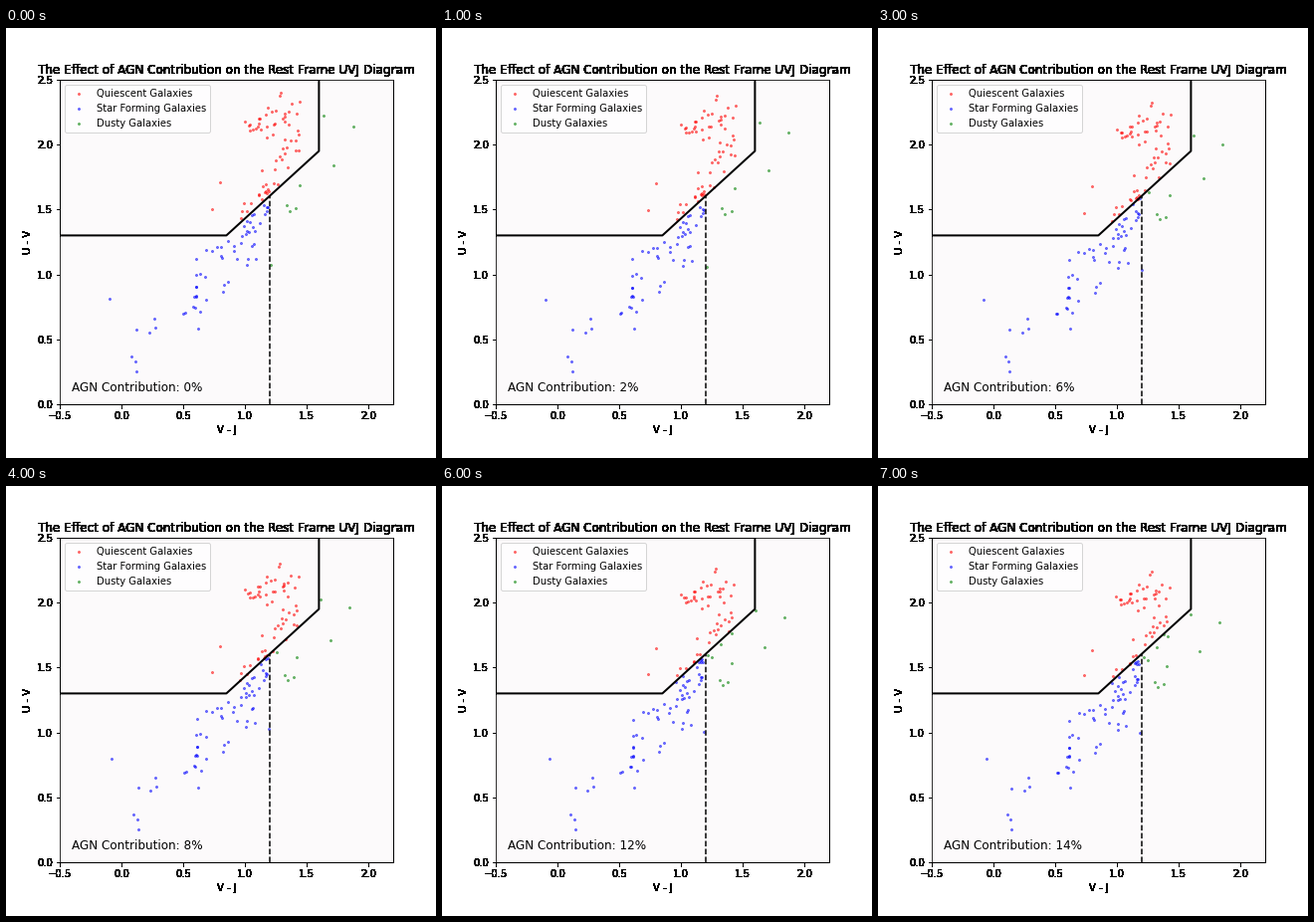
A matplotlib script that plays this animation: 432 by 432 pixels, repeating every 8 s.

```python
import numpy as np
import matplotlib.pyplot as plt
from matplotlib.animation import FuncAnimation

SIZE, DPI = 432, 72
FRAMES, INTERVAL, STEP = 8, 1000, 2  # STEP: percent added per frame
RECT = [0.125, 0.125, 0.775, 0.755]
XLIM, YLIM = (-0.5, 2.2), (0, 2.5)
KNEE, TOP_VJ, MIN_UV, TOP_UV = 0.85, 1.6, 1.3, 1.95
DUSTY_VJ = 1.2
AGN_VJ, AGN_UV = 0.8, 0.36
LAYERS = 40  # stacked axes give the heavy outer labels

rng = np.random.default_rng(7)


def boundary(vj):
    slope = (TOP_UV - MIN_UV) / (TOP_VJ - KNEE)
    return MIN_UV + slope * np.maximum(vj - KNEE, 0)


def box(n, vj, uv):
    """Galaxies spread evenly over a box."""
    return np.column_stack([rng.uniform(*vj, n), rng.uniform(*uv, n)])


def band(n, vj, offset):
    """Galaxies spread along the boundary, offset from it in U - V."""
    pts = box(n, vj, offset)
    pts[:, 1] += boundary(pts[:, 0])
    return pts


OUTLIERS = [(1.88, 2.14), (1.64, 2.22), (1.72, 1.84), (1.44, 1.69),
            (1.21, 1.07), (0.80, 1.71), (0.73, 1.50), (1.29, 2.40),
            (-0.10, 0.81), (0.08, 0.37), (0.11, 0.33), (0.12, 0.25)]

VJ, UV = np.vstack([
    OUTLIERS,
    box(11, (1.00, 1.14), (2.09, 2.20)),    # quiescent
    box(22, (1.17, 1.47), (2.02, 2.38)),
    band(12, (0.94, 1.20), (0.02, 0.13)),
    band(18, (1.13, 1.45), (0.03, 0.30)),
    band(18, (0.92, 1.19), (-0.17, -0.02)),  # star forming
    box(7, (0.66, 0.90), (1.12, 1.26)),
    box(7, (0.59, 0.61), (0.82, 1.15)),
    box(6, (0.62, 0.98), (0.80, 1.02)),
    box(8, (0.90, 1.10), (1.05, 1.26)),
    box(6, (0.48, 0.66), (0.56, 0.79)),
    box(4, (0.03, 0.30), (0.55, 0.72)),
    box(3, (1.29, 1.42), (1.46, 1.57)),      # dusty
]).T

# AGN / galaxy flux ratio in V at 14 %, larger for dust-reddened galaxies
RATIO = 0.03 + 0.05 * np.clip((VJ - 0.4 * UV - 0.42) / 0.3, 0, 1)


def mag(flux_ratio):
    return 2.5 * np.log10(flux_ratio)


def mix(percent):
    """Colours of each galaxy with the AGN light added."""
    v = RATIO * percent / 14
    u = v * 10 ** (0.4 * (UV - AGN_UV))
    j = v * 10 ** (0.4 * (AGN_VJ - VJ))
    return VJ + mag((1 + j) / (1 + v)), UV - mag((1 + u) / (1 + v))


def classify(vj, uv):
    quiescent = (vj < TOP_VJ) & (uv > boundary(vj))
    dusty = ~quiescent & (vj >= DUSTY_VJ)
    return quiescent, ~quiescent & ~dusty, dusty


def add_layer(fig):
    ax = fig.add_axes(RECT, facecolor="#fcfafb")
    ax.set(xlim=XLIM, ylim=YLIM, xlabel="V - J", ylabel="U - V",
           title="The Effect of AGN Contribution on the Rest Frame UVJ Diagram")
    return ax


plt.rcParams["font.family"] = "DejaVu Sans"
fig = plt.figure(figsize=(SIZE / DPI, SIZE / DPI), dpi=DPI, facecolor="white")
for _ in range(LAYERS):
    ax = add_layer(fig)

dots = [ax.scatter([], [], s=4, color=color, alpha=0.5, label=name + " Galaxies")
        for name, color in [("Quiescent", "red"), ("Star Forming", "blue"),
                            ("Dusty", "green")]]
left, top = XLIM[0], YLIM[1]
ax.plot([left, KNEE, TOP_VJ, TOP_VJ, left, left],
        [MIN_UV, MIN_UV, TOP_UV, top, top, MIN_UV], color="black", lw=2)
ax.plot([DUSTY_VJ, DUSTY_VJ], [0, boundary(DUSTY_VJ)],
        color="black", ls="--", lw=1.5)
ax.legend(loc="upper left", fontsize=10)
caption = ax.text(-0.4, 0.1, "", fontsize=12)


def update(i):
    percent = STEP * i
    vj, uv = mix(percent)
    for dot, mask in zip(dots, classify(vj, uv)):
        dot.set_offsets(np.column_stack([vj[mask], uv[mask]]))
    caption.set_text(f"AGN Contribution: {percent}%")
    return [*dots, caption]


anim = FuncAnimation(fig, update, frames=FRAMES, interval=INTERVAL,
                     repeat=True, repeat_delay=0, blit=False)
plt.show()
```
